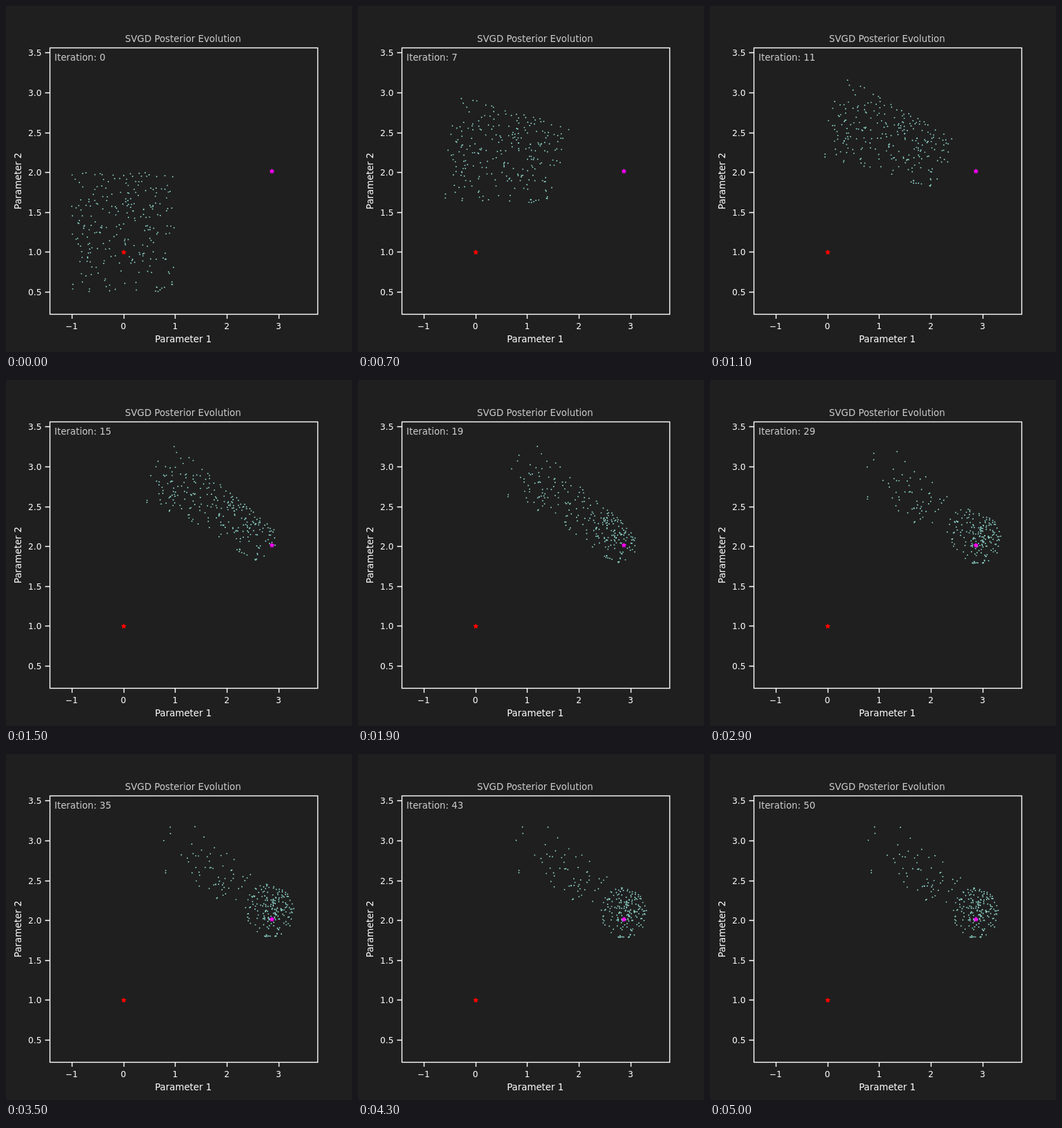
Animation, 500 px wide and 500 px high, one loop 5.1 s. Source, as an HTML page with a canvas:

```html
<!DOCTYPE html>
<html lang="en">
<head>
<meta charset="utf-8">
<title>SVGD Posterior Evolution</title>
<style>
  html, body { margin: 0; height: 100%; overflow: hidden; background: #1f1f1f; }
  canvas { display: block; }
</style>
</head>
<body>
<canvas id="stage" width="500" height="500"></canvas>
<script>
const ctx = document.getElementById('stage').getContext('2d');
const STEP_MS = 100, STEPS = 51, COUNT = 250;
const TAIL = 0.24;       // share of particles that stay behind in the tail
const TAIL_END = 130;    // length of the tail along its axis

const lerp = (a, b, k) => a + (b - a) * k;
const mix = (p, q, k) => [lerp(p[0], q[0], k), lerp(p[1], q[1], k)];
const bilinear = (bl, br, tl, tr, u, v) => mix(mix(bl, br, u), mix(tl, tr, u), v);

let seed = 7;
function random() {
  seed = (seed + 0x6D2B79F5) | 0;
  let t = Math.imul(seed ^ (seed >>> 15), 1 | seed);
  t = (t + Math.imul(t ^ (t >>> 7), 61 | t)) ^ t;
  return ((t ^ (t >>> 14)) >>> 0) / 4294967296;
}

// Poses of a particle with seed (u, v) in the unit square
const startPose = (u, v) => [95 + 148 * u, 413 - 173 * v];

function risingPose(u, v) {
  const [x, y] = bilinear([125, 281], [274, 285], [150, 130], [308, 175], u, v);
  return [x - 32 * v * (1 - v) * (1 - u), y];
}

function sweepingPose(u, v) {
  const s = u ** 0.85;
  const [x, y] = bilinear([201, 178], [358, 265], [244, 93], [388, 216], s, v);
  return [x + 60 * v * (1 - v) * (2 * s - 1), y - 44 * s * (1 - s) * (1 - v)];
}

// The tail and the cluster share a slanted frame: a runs along it, b across
const slant = (x, y, a, b) => [x + 0.8 * a + 0.6 * b, y + 0.6 * a - 0.8 * b];

function tailPose(u, v, lag) {
  const a = lerp(6 - 140 * v * (1 - v), TAIL_END, (u / TAIL) ** 0.7);
  const b = lerp(0.2 * a - 45, 40 - 0.06 * a, v);
  const [x, y] = slant(245, 130, a, b);
  return [x - lag * (8 + 0.28 * a), y + lag * (4 - 8 * v - 0.15 * a)];
}

function clusterPose(time) {
  const lag = Math.exp((23 - time) / 8.6), phase = (time - 23) * Math.PI / 12;
  const cx = 384 - 7 * lag * Math.cos(2 * phase);
  const cy = 229.5 + 8.5 * lag * Math.cos(phase);
  const radius = 33 - 4 * lag * Math.cos(phase);
  return (u, v) => {
    const tail = tailPose(Math.min(u, TAIL), v, lag);
    if (u < TAIL) return tail;
    const p = 2 * (u - TAIL) / (1 - TAIL) - 1, q = 2 * v - 1;
    const a = p * Math.sqrt(1 - q * q / 2), b = q * Math.sqrt(1 - p * p / 2);
    const r = radius * Math.hypot(a, b) ** 0.35;
    const [dx, dy] = slant(0, 0, a * r, b * r);
    const joined = Math.min(1, Math.sqrt((u - TAIL) / 0.25));
    return mix(tail, [cx + dx, cy + 1.1 * dy], 1 - (1 - joined) * lag);
  };
}

const clusterTimes = [23, 29, 35, 43, 50];
const times = [0, 7, 15, ...clusterTimes];
const poses = [startPose, risingPose, sweepingPose, ...clusterTimes.map(clusterPose)];
const particles = Array.from({ length: COUNT }, () => {
  const u = random(), v = random();
  return poses.map(pose => pose(u, v));
});

// Cubic Hermite interpolation through the poses
function positionAt(path, time) {
  let i = 0;
  while (i < times.length - 2 && time >= times[i + 1]) i++;
  const span = times[i + 1] - times[i], k = (time - times[i]) / span, r = 1 - k;
  return [0, 1].map(axis => {
    const slope = j => {
      const from = Math.max(0, j - 1), to = Math.min(times.length - 1, j + 1);
      return (path[to][axis] - path[from][axis]) / (times[to] - times[from]);
    };
    return r * r * (1 + 2 * k) * path[i][axis] + k * k * (3 - 2 * k) * path[i + 1][axis]
      + span * k * r * (r * slope(i) - k * slope(i + 1));
  });
}

function text(str, x, y, size, align = 'center', color = '#fff') {
  ctx.font = `${size}px "DejaVu Sans", sans-serif`;
  ctx.textAlign = align;
  ctx.fillStyle = color;
  ctx.fillText(str, x, y);
}

function star(x, y, color) {
  ctx.beginPath();
  for (let i = 0; i < 10; i++) {
    const r = i % 2 ? 1.3 : 3.2, angle = i * Math.PI / 5;
    ctx.lineTo(x + r * Math.sin(angle), y - r * Math.cos(angle));
  }
  ctx.closePath();
  ctx.fillStyle = ctx.strokeStyle = color;
  ctx.lineWidth = 1.3;
  ctx.lineJoin = 'bevel';
  ctx.fill();
  ctx.stroke();
}

function drawAxes() {
  ctx.strokeStyle = '#fff';
  ctx.lineWidth = 1.39;
  ctx.lineJoin = 'miter';
  ctx.strokeRect(63.5, 60.5, 387, 385);
  ctx.beginPath();
  for (let n = -1; n <= 3; n++) {
    const x = 169.65 + 74.77 * n, snapped = Math.round(x) + 0.5;
    ctx.moveTo(snapped, 445.5);
    ctx.lineTo(snapped, 452);
    text(n < 0 ? '\u2212' + -n : n, x, 467, 12.22);
  }
  for (let n = 0.5; n <= 3.5; n += 0.5) {
    const y = Math.round(470.6 - 115.2 * n);
    ctx.moveTo(63.5, y + 0.5);
    ctx.lineTo(56.5, y + 0.5);
    text(n.toFixed(1), 51.5, y + 5, 12.22, 'right');
  }
  ctx.stroke();
  text('Parameter 1', 256.2, 486, 13.33);
  ctx.save();
  ctx.translate(22, 253);
  ctx.rotate(-Math.PI / 2);
  text('Parameter 2', 0, 0, 13.33);
  ctx.restore();
  text('SVGD Posterior Evolution', 172, 52, 13.33, 'left', '#ccc');
}

function draw(now) {
  const step = Math.floor(now / STEP_MS) % STEPS;
  ctx.fillStyle = '#1f1f1f';
  ctx.fillRect(0, 0, 500, 500);
  ctx.fillStyle = '#8dd3c7';
  for (const path of particles) {
    const [x, y] = positionAt(path, step);
    ctx.beginPath();
    ctx.arc(x, y, 0.95, 0, 2 * Math.PI);
    ctx.fill();
  }
  star(170.2, 355.9, '#f00');
  star(384.3, 238.9, '#f0f');
  drawAxes();
  text('Iteration: ' + step, 70, 79, 13.33, 'left', '#ccc');
}

const start = performance.now();
function tick() {
  draw(performance.now() - start);
  requestAnimationFrame(tick);
}
tick();
</script>
</body>
</html>
```
